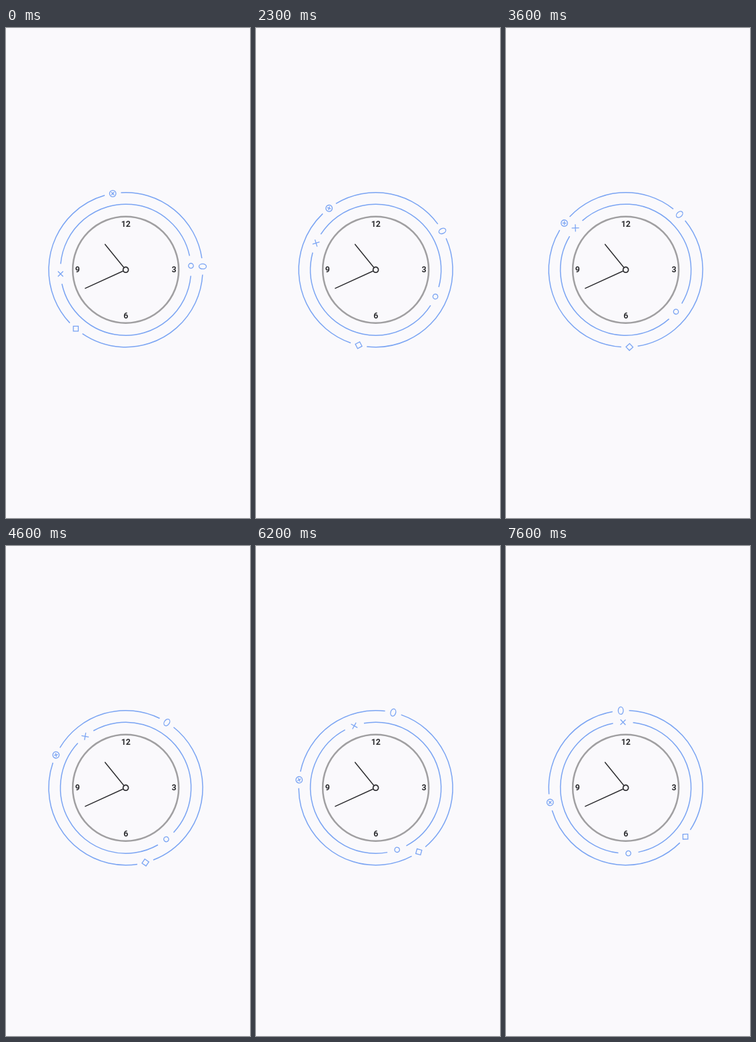
An HTML page with a canvas for the animation above (7700 ms loop, 366x732 px).

```html
<!DOCTYPE html>
<html lang="en">
<head>
<meta charset="utf-8">
<title>Clock with orbiting rings</title>
<style>
  html, body { margin: 0; width: 100%; height: 100%; overflow: hidden; background: #faf9fc; }
  canvas { display: block; width: 366px; height: 732px; }
</style>
</head>
<body>
<canvas id="stage"></canvas>
<script>
const W = 366, H = 732, LOOP = 7700, STEP = 100;
const CX = 179.6, CY = 361.2;
const BG = '#faf9fc', BLUE = '#7aa4f3', INK = '#2d2d30', RIM = '#a09fa1';
const TAU = Math.PI * 2;
const rad = deg => deg * Math.PI / 180;

const canvas = document.getElementById('stage');
const ctx = canvas.getContext('2d');
const dpr = window.devicePixelRatio || 1;
canvas.width = W * dpr;
canvas.height = H * dpr;

function oval(rx, ry) {
  ctx.beginPath();
  ctx.ellipse(0, 0, rx, ry, 0, 0, TAU);
  ctx.stroke();
}

function cross(r) {
  ctx.beginPath();
  ctx.moveTo(-r, -r);
  ctx.lineTo(r, r);
  ctx.moveTo(-r, r);
  ctx.lineTo(r, -r);
  ctx.stroke();
}

const icons = {
  oval: () => oval(5.5, 3.8),
  badge: () => { oval(4.8, 4.8); cross(2.1); },
  square: () => ctx.strokeRect(-3.7, -3.7, 7.4, 7.4),
  cross: () => cross(3.9),
  dot: () => oval(3.7, 3.7)
};

// Angles in degrees, clockwise from three o'clock; speed in degrees per second.
const rings = [
  { r: 115.5, speed: -12, gap: 6.15, items: [['oval', -2.5], ['square', 130.4], ['badge', 260.3]] },
  { r: 98, speed: 12, gap: 8.8, items: [['dot', -3.5], ['cross', 176.4]] }
];

function drawRing({ r, speed, gap, items }, sec) {
  ctx.save();
  ctx.translate(CX, CY);
  ctx.rotate(rad(speed * sec));
  ctx.strokeStyle = BLUE;
  items.forEach(([name, angle], i) => {
    const next = i + 1 < items.length ? items[i + 1][1] : items[0][1] + 360;
    ctx.lineWidth = 1.5;
    ctx.beginPath();
    ctx.arc(0, 0, r, rad(angle + gap), rad(next - gap));
    ctx.stroke();

    ctx.save();
    ctx.translate(r * Math.cos(rad(angle)), r * Math.sin(rad(angle)));
    ctx.lineWidth = 1.3;
    icons[name]();
    ctx.restore();
  });
  ctx.restore();
}

function hand(dx, dy) {
  ctx.beginPath();
  ctx.moveTo(0, 0);
  ctx.lineTo(dx, dy);
  ctx.stroke();
}

function drawClock() {
  ctx.save();
  ctx.translate(CX, CY);
  ctx.strokeStyle = RIM;
  ctx.lineWidth = 2.5;
  oval(79.5, 79.5);

  ctx.fillStyle = INK;
  ctx.font = '700 12.3px Roboto, Arial, sans-serif';
  ctx.textAlign = 'center';
  ctx.textBaseline = 'alphabetic';
  [['12', 0.2, -64.4], ['3', 72.4, 4.2], ['6', 0.1, 73.2], ['9', -72.3, 4.2]]
    .forEach(([label, x, y]) => ctx.fillText(label, x, y));

  ctx.strokeStyle = INK;
  ctx.lineWidth = 1.5;
  ctx.lineCap = 'round';
  hand(-31, -38);
  hand(-60.7, 27.7);

  ctx.fillStyle = BG;
  ctx.lineWidth = 1.7;
  ctx.beginPath();
  ctx.arc(0, 0, 4, 0, TAU);
  ctx.fill();
  ctx.stroke();
  ctx.restore();
}

function draw(now) {
  const t = Math.floor((now + 8) / STEP) * STEP % LOOP;
  ctx.setTransform(dpr, 0, 0, dpr, 0, 0);
  ctx.fillStyle = BG;
  ctx.fillRect(0, 0, W, H);
  rings.forEach(ring => drawRing(ring, t / 1000));
  drawClock();
}

function tick(now) {
  draw(now);
  requestAnimationFrame(tick);
}

draw(0);
requestAnimationFrame(tick);
</script>
</body>
</html>
```
